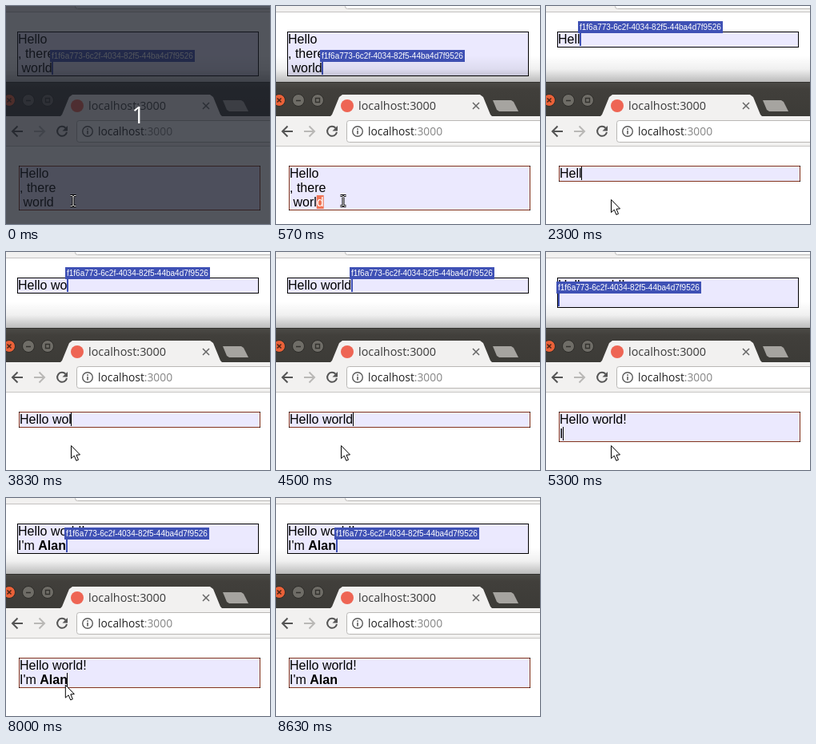
Animation of 330 by 273 pixels, one loop 8.86 s. Source, as an HTML page with a canvas:

```html
<!DOCTYPE html>
<html lang="en">
<head>
<meta charset="utf-8">
<title>Shared editor</title>
<style>
html, body { margin: 0; width: 100%; height: 100%; overflow: hidden; background: #fff; }
canvas { display: block; }
</style>
</head>
<body>
<canvas id="stage" width="330" height="273"></canvas>
<script>
const c = document.getElementById('stage').getContext('2d');
const LOOP = 8860, LINE = 18;
const SANS = '"Liberation Sans", Arial, sans-serif';
const UI = '"Open Sans", "Noto Sans", sans-serif';
const BLUE = '#3f51b5';
const USER_ID = 'f1f6a773-6c2f-4034-82f5-44ba4d7f9526';

// Both editors receive the same keys; the remote one lags behind.
const KEYS = "o wol<rld!\nI'm Alan";
const local = {
  x: 16, y: 200,
  times: [2830, 3300, 3530, 3600, 3830, 4130, 4213, 4297, 4380, 4547,
    4970, 5300, 5500, 5557, 5613, 6270, 6357, 6443, 6530],
  focus: [[570, 2, 5], [650, 2, 4], [730, 2, 3], [1030, 1, 5], [1300, 0, 4]]
};
const remote = {
  x: 14, y: 32,
  times: [3000, 3300, 3600, 3830, 3970, 4213, 4297, 4380, 4463, 4630,
    5300, 5500, 5557, 5613, 5670, 6357, 6443, 6530, 7000],
  focus: [[650, 2, 5], [730, 2, 4], [1030, 1, 5], [1300, 0, 4]]
};

function rect(x, y, w, h, fill) {
  c.fillStyle = fill;
  c.fillRect(x, y, w, h);
}

function text(s, x, y, font, fill) {
  c.font = font;
  c.fillStyle = fill;
  c.fillText(s, x, y);
}

function poly(points, fill, stroke) {
  c.beginPath();
  points.forEach(([x, y]) => c.lineTo(x, y));
  c.closePath();
  if (fill) { c.fillStyle = fill; c.fill(); }
  if (stroke) { c.strokeStyle = stroke; c.lineWidth = 1; c.stroke(); }
}

function path(d, stroke, width) {
  c.strokeStyle = stroke;
  c.lineWidth = width;
  c.stroke(new Path2D(d));
}

function circle(x, y, r, fill, stroke, width = 1) {
  c.beginPath();
  c.arc(x, y, r, 0, 7);
  if (fill) { c.fillStyle = fill; c.fill(); }
  if (stroke) { c.strokeStyle = stroke; c.lineWidth = width; c.stroke(); }
}

function gradient(y0, y1, ...stops) {
  const g = c.createLinearGradient(0, y0, 0, y1);
  stops.forEach(([at, color]) => g.addColorStop(at, color));
  return g;
}

// A line is plain text, except for the bold name after "I'm ".
function runs(s) {
  return s.startsWith("I'm ") ? [[s.slice(0, 4), ''], [s.slice(4), 'bold ']] : [[s, '']];
}

function widthOf(s) {
  return runs(s).reduce((sum, [part, weight]) => {
    c.font = weight + '16px ' + SANS;
    return sum + c.measureText(part).width;
  }, 0);
}

function drawLine(s, x, y, fill) {
  for (const [part, weight] of runs(s)) {
    text(part, x, y + 14, weight + '16px ' + SANS, fill);
    x += c.measureText(part).width;
  }
}

function editorState({ times, focus }, t) {
  if (t < 2300) {
    const lines = ['Hello', ', there', ' world'];
    const [, row, col] = focus.filter(f => f[0] <= t).pop() || [0, 2, 6];
    return { lines, row, col };
  }
  let s = 'Hell';
  times.forEach((at, i) => {
    if (at <= t) s = KEYS[i] === '<' ? s.slice(0, -1) : s + KEYS[i];
  });
  const lines = s.split('\n'), row = lines.length - 1;
  return { lines, row, col: lines[row].length };
}

// Calls draw(line, row, x, y, width) for the selected part of each line.
function eachSelected({ lines, row, col }, x, y, draw) {
  for (let i = row; i < lines.length; i++) {
    const start = i === row ? col : 0, part = lines[i].slice(start);
    if (part) draw(part, i, x + widthOf(lines[i].slice(0, start)), y + i * LINE, widthOf(part));
  }
}

function drawBox(ed, lines, border) {
  const h = lines.length * LINE + 2, x = ed.x + 1, y = ed.y + 1;
  rect(ed.x, ed.y, 302, h, border);
  rect(x, y, 300, h - 2, '#ebe9fe');
  lines.forEach((s, i) => drawLine(s, x, y + i * LINE, '#000'));
  return h;
}

function drawRemote(t) {
  const s = editorState(remote, t), x = remote.x + 1, y = remote.y + 1;
  drawBox(remote, s.lines, '#000');
  eachSelected(s, x, y, (part, i, sx, sy, w) => rect(sx, sy, w, 17, 'rgba(63,81,181,.4)'));
  const caret = Math.round(x + widthOf(s.lines[s.row].slice(0, s.col)) - .2);
  const top = y + s.row * LINE;
  rect(caret, top, 2, 17, BLUE);
  rect(caret - 2, top - 14, 181, 15, BLUE);
  text(USER_ID, caret, top - 3, '10px ' + SANS, '#fff');
}

function drawLocal(t) {
  const s = editorState(local, t), x = local.x + 1, y = local.y + 1;
  const h = drawBox(local, s.lines, '#83341d');
  for (const cx of [16, 317]) for (const cy of [200, 199 + h]) rect(cx, cy, 1, 1, '#000');
  eachSelected(s, x, y, (part, i, sx, sy, w) => {
    rect(sx, sy, w + (i < 2 ? 4.45 : 0), 17, '#f07355');
    drawLine(part, sx, y + i * LINE, '#fff');
  });
  const blinkOff = (t >= 7500 && t < 8000) || t >= 8500;
  if (t >= 2300 && !blinkOff) {
    rect(Math.floor(x + widthOf(s.lines[s.row])), y + s.row * LINE, 1, 17, '#000');
  }
}

function drawUpperWindow(t) {
  rect(0, 0, 330, 273, '#fff');
  rect(0, 0, 330, 7, '#f2f1f0');
  rect(0, 7, 330, 1, '#c4c2c0');
  c.beginPath();
  c.roundRect(86.5, -20, 260, 23.5, 3);
  c.fillStyle = '#fff';
  c.fill();
  c.strokeStyle = '#b9b7b5';
  c.lineWidth = 1;
  c.stroke();
  drawRemote(t);
  rect(0, 62, 330, 34, gradient(62, 96,
    [0, 'rgba(0,0,0,0)'], [.5, 'rgba(0,0,0,.06)'], [1, 'rgba(0,0,0,.28)']));
}

function drawLowerWindow(t) {
  rect(0, 96, 330, 43, gradient(96, 139, [0, '#4b4a46'], [.2, '#413f3b'], [1, '#3c3b37']));
  rect(0, 95, 330, 1, '#33322f');

  circle(4, 118, 7.5, '#ea6138', '#2e2d2a');
  path('M1.5 115.5l5 5m0-5l-5 5', '#4a2417', 1.5);
  for (const x of [28, 52]) circle(x, 118, 7.5, '#6f6d67', '#2e2d2a');
  path('M25 118.5h6M49.5 115.5h5v5h-5z', '#33322e', 1.4);

  rect(0, 138, 330, 38, '#f2f1f0');
  poly([[67, 139], [70, 136], [79, 114], [83, 111], [255, 111], [259, 114], [268, 136], [271, 139]], '#f2f1f0');
  poly([[271, 118], [294, 118], [297, 120], [303, 132], [279, 132], [276, 130]], '#a6a4a0');
  circle(89, 125, 8, '#ee6554');
  text('localhost:3000', 103, 130, '14.4px ' + UI, '#3a3a3a');
  path('M246 121l8 8m0-8l-8 8', '#666', 1.5);

  rect(0, 175, 330, 1, '#c8c6c4');
  rect(0, 176, 330, 97, '#fff');
  path('M21 157H8.5M14.5 150.5L8 157l6.5 6.5', '#555', 2);
  path('M35 157h12.5M41.5 150.5l6.5 6.5l-6.5 6.5', '#b9b8b6', 2);
  path('M74.5 152.7A6 6 0 1 0 76 158', '#555', 2);
  poly([[77, 150], [77, 156.5], [70.5, 156.5]], '#555');

  c.beginPath();
  c.roundRect(88.5, 143.5, 260, 27, 3);
  c.fillStyle = '#fff';
  c.fill();
  c.strokeStyle = '#b9b7b5';
  c.lineWidth = 1;
  c.stroke();
  circle(102, 157, 6.3, null, '#5a5a5a', 1.4);
  rect(101.2, 156, 1.6, 4.5, '#5a5a5a');
  rect(101.2, 153.3, 1.6, 1.6, '#5a5a5a');
  text('localhost', 115, 162, '13.8px ' + UI, '#222');
  text(':3000', 115 + c.measureText('localhost').width, 162, '13.8px ' + UI, '#858585');
  drawLocal(t);
}

function drawArrow(x, y) {
  poly([[0, 0], [0, 16], [3.8, 12.7], [6.4, 18.8], [9, 17.7], [6.5, 11.7], [11, 11.4]]
    .map(([px, py]) => [x + px + .5, y + py + .5]), '#fff', '#000');
}

function drawPointer(t) {
  if (t < 2300) {
    const beam = 'M80.5 237.5h2.5l1 1l1-1h2.5M84 238v12M80.5 250.5h2.5l1-1l1 1h2.5';
    path(beam, '#000', 3);
    path(beam, '#fff', 1);
    return;
  }
  if (t >= 8630) return;
  // Leaves along a curve through the top edge.
  const u = t < 8000 ? 0 : (Math.floor((t - 8000) / 33.2) + 1) / 20, v = 1 - u;
  const curve = (a, b, d, e) => v * v * v * a + 3 * v * v * u * b + 3 * v * u * u * d + u * u * u * e;
  drawArrow(curve(81, 30, 40, 193), curve(242, 190, 60, -20));
}

function render(t) {
  drawUpperWindow(t);
  drawLowerWindow(t);
  if (t < 100) rect(0, 0, 330, 273, 'rgba(24,28,38,.75)');
  drawPointer(t);
  if (t < 100) {
    c.textAlign = 'center';
    text('1', 165.5, 147, '29px ' + UI, '#fff');
    c.textAlign = 'left';
  }
}

const begin = performance.now();
function tick() {
  render((performance.now() - begin) % LOOP);
  requestAnimationFrame(tick);
}
tick();
</script>
</body>
</html>
```
